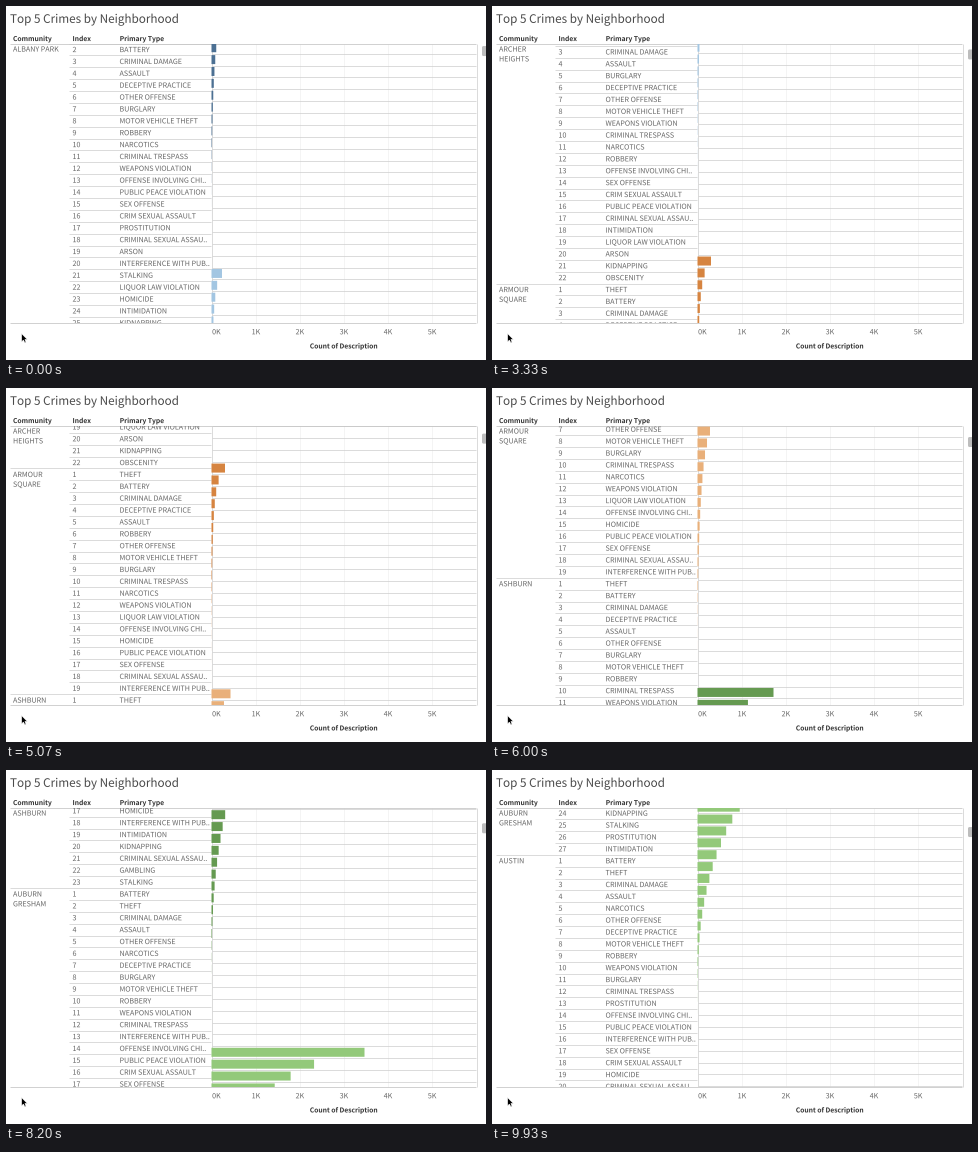
A matplotlib script for the animation above (9.99 s loop, 480x354 px).

```python
import numpy as np
import matplotlib.pyplot as plt
from matplotlib.animation import FuncAnimation
from matplotlib.collections import LineCollection
from matplotlib.patches import FancyBboxPatch, PathPatch, Polygon, Rectangle
from matplotlib.textpath import TextPath
from matplotlib.transforms import Affine2D

W, H, DPI = 480, 354, 100
FRAMES, LOOP = 150, 9990
TOP, BOTTOM = 37.5, 317
PITCH = 11.88
ZERO, PER_K = 205.5, 44.1
FONT, BODY, BOLD = "Noto Sans CJK JP", 7.13, 6.7
RULE = "#d2d2d2"

NAMES = {
    "TH": "THEFT", "BA": "BATTERY", "CD": "CRIMINAL DAMAGE", "AS": "ASSAULT",
    "DP": "DECEPTIVE PRACTICE", "OO": "OTHER OFFENSE", "BU": "BURGLARY",
    "MV": "MOTOR VEHICLE THEFT", "RO": "ROBBERY", "NA": "NARCOTICS",
    "CT": "CRIMINAL TRESPASS", "WV": "WEAPONS VIOLATION",
    "OC": "OFFENSE INVOLVING CHI..", "PP": "PUBLIC PEACE VIOLATION",
    "SO": "SEX OFFENSE", "CS": "CRIM SEXUAL ASSAULT", "PR": "PROSTITUTION",
    "CA": "CRIMINAL SEXUAL ASSAU..", "AR": "ARSON",
    "IP": "INTERFERENCE WITH PUB..", "ST": "STALKING",
    "LL": "LIQUOR LAW VIOLATION", "HO": "HOMICIDE", "IN": "INTIMIDATION",
    "KI": "KIDNAPPING", "OB": "OBSCENITY", "GA": "GAMBLING",
    "CC": "CONCEALED CARRY LICEN..",
}

# label, bar colour, longest bar in pixels, falloff, crime types in order
COMMUNITIES = [
    ("ALBANY PARK", "#4c7093", 30, 0.50,
     "TH BA CD AS DP OO BU MV RO NA CT WV OC PP SO CS PR CA AR IP ST LL HO IN KI"),
    ("ARCHER HEIGHTS", "#a3c6e2", 10.5, 0.62,
     "TH BA CD AS BU DP OO MV WV CT NA RO OC SO CS PP CA IN LL AR KI OB"),
    ("ARMOUR SQUARE", "#d68440", 13.5, 0.64,
     "TH BA CD DP AS RO OO MV BU CT NA WV LL OC HO PP SO CA IP"),
    ("ASHBURN", "#e9b07a", 19, 0.42,
     "TH BA CD DP AS OO BU MV RO CT WV NA OC SO PP CS HO IP IN KI CA GA ST"),
    ("AUBURN GRESHAM", "#659a51", 76, 0.41,
     "BA TH CD AS OO NA DP BU MV RO WV CT IP OC PP CS SO HO AR CC CA LL GA KI ST PR IN"),
    ("AUSTIN", "#93c97a", 153, 0.40,
     "BA TH CD AS NA OO DP MV RO WV BU CT PR OC PP IP SO CS HO CA AR LL ST IN KI"),
]

# scroll gestures: start ms, end ms, position reached
SWIPES = [
    (-500, 800, 147), (1000, 2270, 306.5), (3070, 3930, 402),
    (3930, 4600, 503.6), (5000, 5700, 620), (5700, 6200, 850),
    (6730, 7700, 965), (7700, 8470, 1174.6), (8530, 9010, 1309),
    (9010, 9330, 1319), (9530, 9990, 1436),
]


def ease(u):
    u = min(max(u, 0), 1) ** 0.85
    return u * u * (3 - 2 * u)


def chart_scroll(ms):
    pos = 0
    for start, end, goal in SWIPES:
        pos += (goal - pos) * ease((ms - start) / (end - start))
    return pos


def header_scroll(ms):
    """The row headers only catch up when a swipe has ended."""
    return max([0] + [goal for _, end, goal in SWIPES if end <= ms])


def bar_length(i, peak, falloff):
    return peak * np.exp(-falloff * i ** 0.72 - 0.6 * (i / 13) ** 4)


def row_y(row):
    return 43.5 + (row - 2) * PITCH


fig = plt.figure(figsize=(W / DPI, H / DPI), dpi=DPI, facecolor="white")
ax = fig.add_axes([0, 0, 1, 1])
ax.set_xlim(0, W)
ax.set_ylim(H, 0)
ax.axis("off")

window = Rectangle((0, 1 - BOTTOM / H), 1, (BOTTOM - TOP) / H,
                   transform=fig.transFigure)
head_shift, chart_shift = Affine2D(), Affine2D()


def add(artist, shift=None):
    """Add an artist; one with a shift scrolls inside the table window."""
    if shift is not None:
        artist.set_transform(shift + ax.transData)
    ax.add_artist(artist)
    if shift is not None:
        artist.set_clip_path(window)
    return artist


def label(x, y, text, px=BODY, color="#666666", weight="normal",
          center=False, shift=None):
    """Text outline centred on y by its cap height."""
    path = TextPath((0, 0), text, size=px, prop={"family": FONT, "weight": weight})
    if center:
        x -= path.get_extents().width / 2
    place = Affine2D().scale(1, -1).translate(x, y + 0.366 * px)
    return add(PathPatch(place.transform_path(path), fc=color, ec="none",
                         snap=False, zorder=4), shift)


def header(x, y, text, center=False):
    label(x, y, text, BOLD, "#333333", "bold", center)


def lines(segments, color=RULE, shift=None):
    add(LineCollection(segments, colors=color, linewidths=0.8 * 72 / DPI, zorder=2),
        shift)


def hline(x0, x1, y):
    return [(x0, y), (x1, y)]


def vline(x, y0=TOP, y1=BOTTOM):
    return [(x, y0), (x, y1)]


# chart grid
lines([vline(ZERO + k * PER_K) for k in range(1, 6)], "#f2f2f2")
lines([hline(206, 470, row_y(r + 0.5)) for r in range(160)], shift=chart_shift)

# rows, bars and community labels
row_labels, places, separators = [], [], []
row = 1
for name, color, peak, falloff, codes in COMMUNITIES:
    first = row
    for i, code in enumerate(codes.split()):
        y = row_y(row)
        pair = [label(66.5, y, str(i + 1), shift=head_shift),
                label(113.5, y, NAMES[code], shift=head_shift)]
        row_labels.append((y, pair))
        add(Rectangle((ZERO, y - 4.5), bar_length(i, peak, falloff), 9, fc=color,
                      ec="none", snap=False, zorder=3), chart_shift)
        row += 1
        separators.append(hline(63, 205, row_y(row - 0.5)))
    separators[-1] = hline(4, 205, row_y(row - 0.5))
    words = name.split() if len(name) > 11 else [name]
    shift = Affine2D()
    parts = [label(7, 9.8 * i, s, shift=shift) for i, s in enumerate(words)]
    places.append((row_y(first), row_y(row - 0.5), shift, parts))
lines(separators, shift=head_shift)

# frame of the table
lines([hline(4, 470, TOP), hline(4, 470, BOTTOM)], "#c6c6c6")
lines([vline(ZERO), vline(470.5), vline(479.5, 0, H)])

label(4, 12.6, "Top 5 Crimes by Neighborhood", 11.7, "#4a4a4a")
header(7, 32.6, "Community")
header(66.5, 32.6, "Index")
header(113.7, 32.6, "Primary Type")
header(337.3, 340, "Count of Description", center=True)
for k in range(6):
    label(max(210.2, ZERO + k * PER_K), 325.7, f"{k}K", center=True)

thumb = add(FancyBboxPatch((477, 0), 4, 8, boxstyle="round,pad=1,rounding_size=1.5",
                           fc="#bdbdbd", lw=0, zorder=3))

arrow = np.array([(0, 0), (0, 8.2), (1.9, 6.5), (3.2, 9.3), (4.5, 8.7),
                  (3.3, 5.9), (5.7, 5.8)])
add(Polygon(arrow + (15.6, 327.6), fc="black", ec="white", lw=0.4, zorder=5))


def update(n):
    ms = round(n * 1000 / 15, -1)
    chart, head = chart_scroll(ms), header_scroll(ms)
    chart_shift.clear().translate(0, -chart)
    head_shift.clear().translate(0, -head)
    thumb.set_y(40.3 + 0.0124 * chart)
    for y, pair in row_labels:
        for t in pair:
            t.set_visible(TOP - 6 < y - head < BOTTOM + 6)
    for start, end, shift, parts in places:
        # the label sticks to the top until its last row pushes it out
        last = end - head - 6 - 9.8 * (len(parts) - 1)
        shift.clear().translate(0, min(max(43, start - head), last))
        for t in parts:
            t.set_visible(end - head > TOP)
    return []


anim = FuncAnimation(fig, update, frames=FRAMES, interval=LOOP / FRAMES,
                     init_func=lambda: update(0), repeat=True, repeat_delay=0,
                     blit=False)
plt.show()
```
